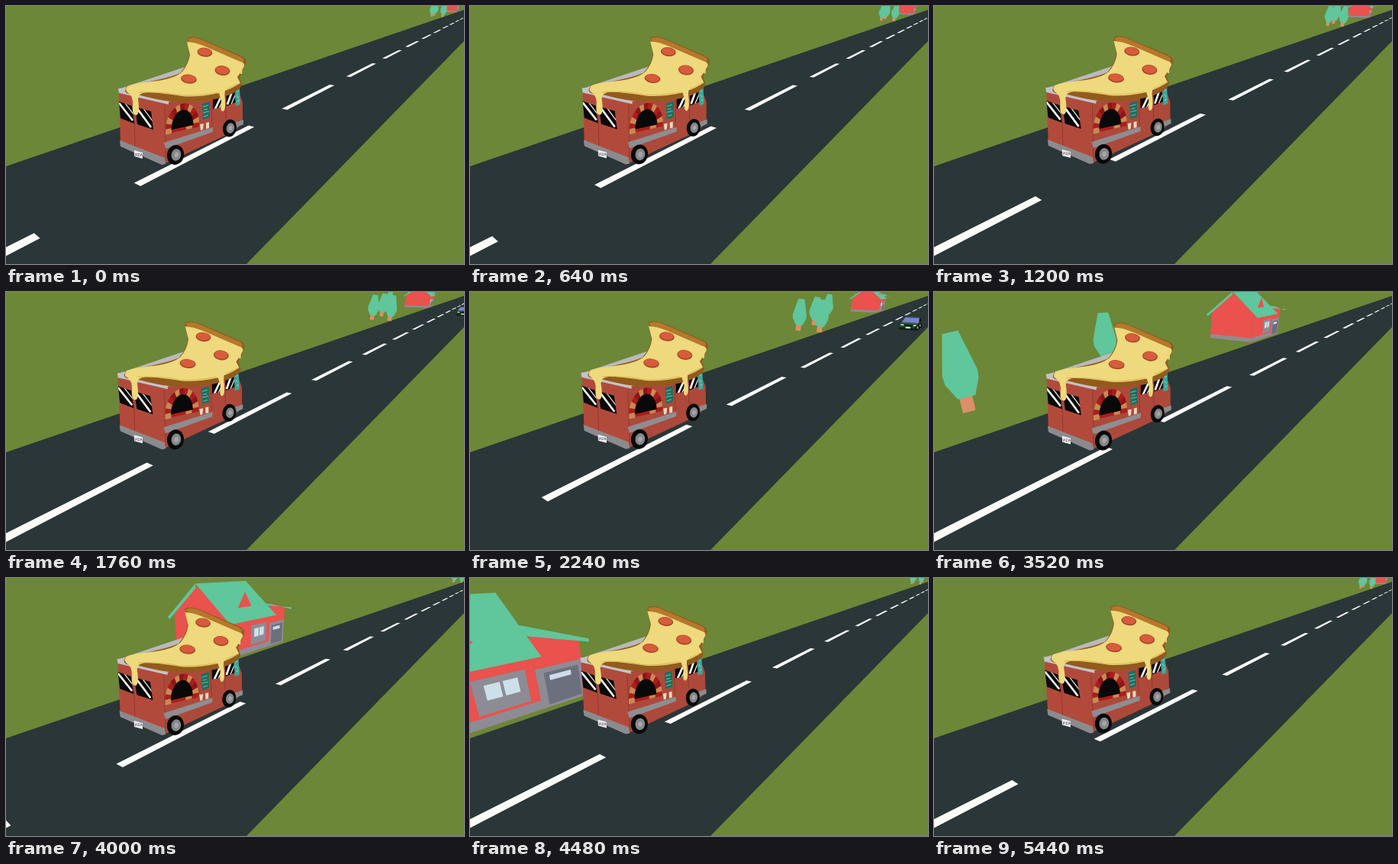
Animation, 600 px wide and 338 px high, one loop 5.52 s. Source, as an HTML page with a canvas:

```html
<!DOCTYPE html>
<html lang="en">
<head>
<meta charset="utf-8">
<title>Pizza truck</title>
<style>
html, body { margin: 0; width: 100%; height: 100%; overflow: hidden; background: #6b8737; }
canvas { display: block; width: 100vw; height: 100vh; }
</style>
</head>
<body>
<canvas id="stage" width="600" height="338"></canvas>
<script>
const ctx = document.getElementById('stage').getContext('2d');
const LOOP = 5520, STEP = 80;
const PERIOD = 1.694, DASH = 1.145, LAP = PERIOD * 18;

const RED = '#e9524d', TEAL = '#60c69b', GRAY = '#8d8c94', WHITE = '#fbfbf8', BLACK = '#090909';

// time, distance travelled, body sway
const KEYS = [
  [0, 0, 0], [1200, 6.4, 0.25], [2240, 12.2, 0.5], [2800, 15.36, 0.6],
  [3520, 19.43, 0.1], [4480, 24.85, 0.8], [5440, 30.25, 1], [5520, LAP, 1]
];

function keyed(t, col) {
  let i = 0;
  while (i < KEYS.length - 2 && t >= KEYS[i + 1][0]) i++;
  const a = KEYS[i], b = KEYS[i + 1];
  return a[col] + (b[col] - a[col]) * (t - a[0]) / (b[0] - a[0]);
}

// x: across the road, h: height, z: along the road
function project(x, h, z) {
  const g = 1 - h;
  const depth = 0.39 * g - 0.557 * x + 0.733 * z;
  return [
    300 + 436 * (0.796 * x + 0.605 * z) / depth,
    169 + 436 * (0.921 * g + 0.236 * x - 0.31 * z) / depth
  ];
}

function poly(fill, pts) {
  ctx.beginPath();
  pts.forEach(p => ctx.lineTo(p[0], p[1]));
  ctx.closePath();
  ctx.fillStyle = fill;
  ctx.fill();
}

function shape(fill, path) {
  ctx.fillStyle = fill;
  ctx.fill(new Path2D(path));
}

function stroke(color, width, path) {
  ctx.strokeStyle = color;
  ctx.lineWidth = width;
  ctx.stroke(new Path2D(path));
}

function oval(fill, x, y, rx, ry, turn = 0) {
  ctx.beginPath();
  ctx.ellipse(x, y, rx, ry, turn, 0, Math.PI * 2);
  ctx.fillStyle = fill;
  ctx.fill();
}

const solid = (fill, pts) => poly(fill, pts.map(p => project(...p)));

// upright panels parallel to the road, and across it
const along = (fill, x, z1, z2, h1, h2) =>
  solid(fill, [[x, h1, z1], [x, h2, z1], [x, h2, z2], [x, h1, z2]]);
const across = (fill, z, x1, x2, h1, h2) =>
  solid(fill, [[x1, h1, z], [x1, h2, z], [x2, h2, z], [x2, h1, z]]);

function road(dist) {
  ctx.fillStyle = '#6b8737';
  ctx.fillRect(0, 0, 600, 338);
  poly('#2b3638', [[660, -15.5], [0, 210], [0, 338], [315, 338]]);
  const first = (0.967 - dist) % PERIOD - PERIOD;
  for (let n = 24; n >= 0; n--) {
    const near = first + n * PERIOD, far = near + DASH;
    if (far < -1.2) continue;
    const z = Math.max(near, -1.2);
    solid(WHITE, [[-1.464, 0, z], [-1.464, 0, far], [-1.407, 0, far], [-1.407, 0, z]]);
  }
}

function tree(x, z) {
  const [bx, by] = project(x, 0, z), [tx, ty] = project(x, 0.64, z);
  const ax = tx - bx, ay = ty - by;
  const at = (u, v) => [bx + ax * v - ay * u, by + ay * v + ax * u];
  poly('#dc8f68', [at(-0.08, 0), at(0.08, 0), at(0.08, 0.2), at(-0.08, 0.2)]);
  poly(TEAL, [at(-0.1, 1), at(0.1, 1), at(0.22, 0.48), at(0.21, 0.38),
    at(0.12, 0.18), at(-0.1, 0.18), at(-0.21, 0.38), at(-0.22, 0.5)]);
}

function house(_, z) {
  const front = -2.35, back = -3.16, ridge = -2.755;
  const mid = z + 0.92, end = z + 1.31;
  // low wing
  solid(RED, [[front, 0, mid], [front, 0.56, mid], [front, 0.47, end], [front, 0, end]]);
  solid(TEAL, [[-3.35, 0.475, end + 0.03], [-2.26, 0.48, end + 0.03],
    [-2.26, 0.455, end + 0.03], [front, 0.55, mid], [-3.35, 0.55, mid]]);
  // main block
  solid(RED, [[back, 0, z], [back, 0.46, z], [ridge, 0.8, z], [front, 0.48, z], [front, 0, z]]);
  along(RED, front, z, mid, 0, 0.48);
  across(GRAY, z, back, front, 0, 0.07);
  along(GRAY, front, z, end, 0, 0.07);
  // window
  along(GRAY, front, z + 0.5, z + 0.85, 0.09, 0.33);
  along('#cde0ea', front, z + 0.57, z + 0.67, 0.18, 0.285);
  along('#cde0ea', front, z + 0.69, z + 0.79, 0.18, 0.285);
  // door
  along(GRAY, front, z + 0.92, end, 0, 0.31);
  along('#6c6f7d', front, z + 0.98, z + 1.27, 0.02, 0.27);
  along('#cfdcee', front, z + 1.02, z + 1.2, 0.205, 0.245);
  // roof
  solid(TEAL, [[-3.25, 0.416, z - 0.03], [ridge, 0.82, z - 0.03],
    [ridge, 0.77, z - 0.03], [-3.22, 0.39, z - 0.03]]);
  solid(TEAL, [[ridge, 0.82, z - 0.03], [ridge, 0.82, z + 0.94],
    [-2.26, 0.416, z + 0.94], [-2.26, 0.416, z - 0.03]]);
  solid(RED, [[-2.42, 0.55, z + 0.32], [-2.42, 0.72, z + 0.46], [-2.42, 0.55, z + 0.6]]);
}

function car(z) {
  const l = -1.06, r = -0.73, end = z + 0.76;
  const tyre = at => {
    const [x, y] = project(r, 0.05, at), [, top] = project(r, 0.1, at);
    oval(BLACK, x, y, (y - top) * 0.85, (y - top) * 1.05, -0.3);
    oval('#777f7d', x, y, (y - top) * 0.45, (y - top) * 0.6, -0.3);
  };
  solid('#121d1a', [[l, 0, z], [r, 0, z], [r, 0, end], [l, 0, end]]);
  along('#173f25', r, z, end, 0.03, 0.14);
  across('#1c4a2a', z, l, r, 0.03, 0.13);
  solid('#28633a', [[l, 0.13, z], [r, 0.13, z], [r, 0.14, end], [l, 0.14, end]]);
  // cabin
  const cl = l + 0.03, cr = r - 0.03;
  solid('#143521', [[r, 0.14, z + 0.2], [cr, 0.23, z + 0.37], [cr, 0.23, z + 0.6], [r, 0.14, z + 0.74]]);
  solid('#0a1413', [[r, 0.15, z + 0.27], [cr, 0.215, z + 0.39], [cr, 0.215, z + 0.58], [r, 0.15, z + 0.66]]);
  solid('#7c80d3', [[l, 0.14, z + 0.19], [cl, 0.23, z + 0.37], [cr, 0.23, z + 0.37], [r, 0.14, z + 0.19]]);
  solid('#245b38', [[cl, 0.23, z + 0.37], [cr, 0.23, z + 0.37], [cr, 0.23, z + 0.6], [cl, 0.23, z + 0.6]]);
  // front
  across('#0b1512', z, l + 0.09, r - 0.09, 0.08, 0.11);
  across('#dfe8d8', z, l + 0.015, l + 0.075, 0.09, 0.115);
  across('#dfe8d8', z, r - 0.075, r - 0.015, 0.09, 0.115);
  across('#0f2118', z, l, r, 0.02, 0.05);
  across(WHITE, z, -0.94, -0.85, 0.035, 0.065);
  tyre(z + 0.14);
  tyre(z + 0.6);
}

function glass(path, wide, thin) {
  shape(BLACK, path);
  ctx.save();
  ctx.clip(new Path2D(path));
  stroke(WHITE, 2.6, wide);
  stroke(WHITE, 1.2, thin);
  ctx.restore();
}

function oven() {
  const bricks = 11;
  ctx.save();
  ctx.transform(1, -0.22, 0, 1, 231, 158);
  for (let i = 0; i < bricks; i++) {
    const a = Math.PI * (1 + i / bricks);
    ctx.beginPath();
    ctx.ellipse(0, 0, 22, 30, 0, a, a + Math.PI / bricks + 0.02);
    ctx.lineTo(0, 0);
    ctx.fillStyle = i % 3 === 1 ? '#c98a52' : i % 2 ? '#8d1518' : '#ab1d1b';
    ctx.fill();
  }
  ctx.fillStyle = '#ab1d1b';
  ctx.fillRect(-22, -1, 44, 6);
  ctx.fillStyle = '#c98a52';
  ctx.fillRect(-22, -1, 8, 7);
  ctx.fillRect(5, 1, 8, 4);
  ctx.beginPath();
  ctx.ellipse(0, 1, 14.5, 23, 0, Math.PI, 0);
  ctx.fillStyle = BLACK;
  ctx.fill();
  ctx.restore();
}

function wheel(x, y, rx, ry) {
  oval(BLACK, x, y, rx, ry, 0.2);
  oval('#85878a', x + 1, y, rx * 0.58, ry * 0.6, 0.2);
  oval('#a5a7a9', x + 1.2, y, rx * 0.25, ry * 0.27, 0.2);
}

function body() {
  shape('#b9b9bd', 'M147 109 L237 79 L303 103 L212 130Z');
  shape('#b24a3c', 'M148 110 L209 127 L209 206 L150 181Z');
  shape('#ad493a', 'M208 127 L300 103 L307 118 L310 126 L310 153 L299 164 L209 206Z');
  shape('#c3c3c6', 'M147 108 L160 107 L213 120 L213 129 L148 114Z');
  stroke('#8a372c', 0.8, 'M168 122 L169 188 M208 130 L209 203 M269 119 L270 158 M288 126 L288 149');
  // rear
  glass('M148 125 L165 131 L168 154 L150 147Z', 'M148 127 L166 150', 'M155 126 L171 147');
  glass('M169 132 L190 138 L193 162 L172 155Z', 'M171 133 L190 159', 'M179 133 L196 156');
  shape('#8b8b8e', 'M149 176 L208 199 L209 207 L204 208 L150 184Z');
  shape('#eeeeee', 'M168 189 L179 192 L179 200 L168 197Z');
  ctx.fillStyle = '#6b5b74';
  ctx.font = 'bold 5px Arial, "Liberation Sans", sans-serif';
  ctx.fillText('PZA', 169, 196.5);
  // serving side
  oven();
  shape('#1d6f60', 'M257 128 L267 125 L267 146 L258 149Z');
  stroke('#79c9b3', 0.9, 'M258 132 L265 130 M259 136 L264 135 M258 140 L266 138 M259 145 L265 143');
  shape('#8e8d91', 'M207 179 L271 159 L271 165 L209 187Z');
  shape('#e4d9bd', 'M254 155 L259 154 L258 162 L255 163Z M262 153 L266 152 L266 160 L262 161Z');
  // cab
  glass('M271 121 L286 116 L286 132 L271 135Z', 'M273 137 L283 116', 'M278 136 L287 119');
  glass('M288 112 L299 107 L301 126 L289 131Z', 'M290 129 L298 107', 'M295 129 L302 113');
  shape('#3aa79c', 'M300 109 L306 107 L307 129 L301 131Z');
  stroke('#9be0d5', 0.9, 'M302 112 L305 111 M302 117 L305 120 M303 125 L306 123');
  shape('#8b8b8e', 'M299 153 L311 149 L311 155 L300 160Z');
}

function pizza() {
  // crust
  shape('#935a1e', 'M237 42 Q243 39 253 42 L307 65 Q316 69 314 75 Q310 86 306 93 L309 103 Q306 110 298 114 ' +
    'Q283 121 268 123 Q240 127 215 125 Q194 122 176 117 Q157 117 156 111 L158 105 Q212 95 228 88 Q238 77 240 64Z');
  shape('#b5782c', 'M238 43 Q245 40 253 43 L306 66 Q313 69 311 73 L306 76 L240 49Z');
  // cheese
  shape('#eed97c', 'M237 47 Q247 47 261 53 L307 73 Q313 74 312 79 Q308 87 303 93 L307 101 ' +
    'Q296 108 287 111 Q286 114 287 123 Q288 138 283.5 138 Q280 137 282 124 L279 114 Q250 120 230 118 ' +
    'Q198 113 184 113 Q173 114 173 122 Q176 143 170 143 Q165 143 166 131 Q167 118 160 114 Q155 111 159 105 ' +
    'Q168 101 190 99 Q219 96 230 87 Q239 77 241 64Z');
  stroke('#d8b854', 1, 'M174 113 Q207 112 229 117 Q255 118 277 113 M289 109 L306 101');
  stroke('#eed97c', 2, 'M309 77 L308 89');
  for (const [x, y, rx, ry] of [[260.5, 60, 10, 6], [283.5, 84, 10, 6.5], [239.5, 95, 10.5, 6]]) {
    oval('#a8452a', x, y + 0.6, rx, ry, 0.12);
    oval('#d75c3c', x, y, rx - 1.2, ry - 1.1, 0.12);
  }
}

function truck(sway) {
  const lean = 6 * sway / 160;
  ctx.save();
  ctx.transform(1, 0, lean, 1, -200 * lean, -4.5 * sway);
  body();
  wheel(222, 195, 11, 13);
  wheel(293, 160, 9, 11.5);
  pizza();
  ctx.restore();
}

const scenery = [
  [house, 0, 25.06], [tree, -2.76, 19.36], [tree, -2.31, 19.38],
  [tree, -2.82, 20.5], [tree, -3.11, 22.33]
];

function draw(t) {
  const dist = keyed(t, 1);
  road(dist);
  scenery
    .map(([fn, x, z]) => ({ fn, x, z: z - dist < -1.2 ? z - dist + LAP : z - dist }))
    .filter(o => o.z < 29.5)
    .sort((a, b) => b.z - a.z)
    .forEach(o => o.fn(o.x, o.z));
  truck(keyed(t, 2));
  const carZ = 8.69 - 0.0082 * (t - 2240);
  if (carZ > -0.7 && carZ < 17.5) car(carZ);
}

const start = performance.now();
function tick() {
  const t = (performance.now() - start) % LOOP;
  draw(Math.floor(t / STEP) * STEP);
  requestAnimationFrame(tick);
}
tick();
</script>
</body>
</html>
```
